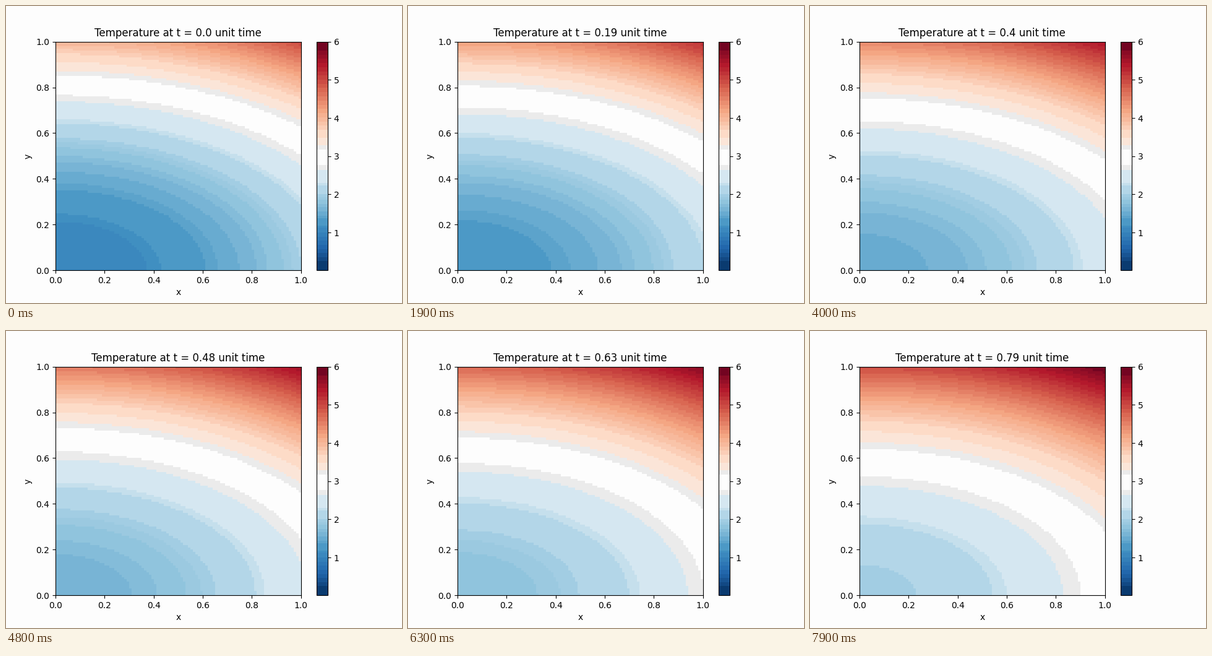
These frames come from a looping animation (640x480 px, 8000 ms). A matplotlib script:

```python
import numpy as np
import matplotlib.pyplot as plt
from matplotlib.animation import FuncAnimation
from matplotlib.colors import ListedColormap

PAPER = "#fdfdfd"
GREY = "#ebebeb"
N = 100              # cells per side
DT = 0.01            # time step
STEPS = 80
VMIN, VMAX = 0.01, 6.0


def temperature(t):
    """Heat equation solution 1 + x^2 + 3 y^2 + 1.2 t at the cell centres."""
    c = (np.arange(N) + 0.5) / N
    x, y = np.meshgrid(c, c)
    return 1 + x**2 + 3 * y**2 + 1.2 * t


def banded_cmap(size=1200):
    """RdBu_r reduced to flat bands, with a paper-coloured middle."""
    cold = [1.1395, 1.181, 1.372, 1.44, 1.557, 1.672, 1.748, 1.8605,
            1.93, 2.001, 2.24, 2.307, 2.635, 2.76]
    warm = [3.18, 3.297, 3.488]
    edges = np.concatenate([[VMIN], np.linspace(0.25, 1.0, 8), cold, warm,
                            np.linspace(3.69, 5.77, 20), [VMAX]])
    mids = (edges[:-1] + edges[1:]) / 2
    bands = plt.get_cmap("RdBu_r")(mids / VMAX)[:, :3]
    for value, colour in ((2.7, GREY), (2.97, PAPER), (3.24, GREY)):
        band = np.searchsorted(edges, value) - 1
        bands[band] = plt.matplotlib.colors.to_rgb(colour)
    values = VMIN + (np.arange(size) + 0.5) / size * (VMAX - VMIN)
    return ListedColormap(bands[np.searchsorted(edges, values) - 1])


plt.rcParams["font.family"] = "DejaVu Sans"
fig, ax = plt.subplots(figsize=(6.4, 4.8), dpi=100, facecolor=PAPER)
grid = np.linspace(0, 1, N + 1)
mesh = ax.pcolormesh(grid, grid, temperature(0), cmap=banded_cmap(),
                     vmin=VMIN, vmax=VMAX)
fig.colorbar(mesh, ax=ax, ticks=range(1, 7))
ax.set(xlim=(0, 1), ylim=(0, 1), xlabel="x", ylabel="y")
title = ax.set_title("")


def update(k):
    t = k * DT
    mesh.set_array(temperature(t))
    title.set_text(f"Temperature at t = {t} unit time")
    return mesh, title


anim = FuncAnimation(fig, update, frames=STEPS, interval=100,
                     init_func=lambda: update(0), repeat=True, blit=False)
plt.show()
```
